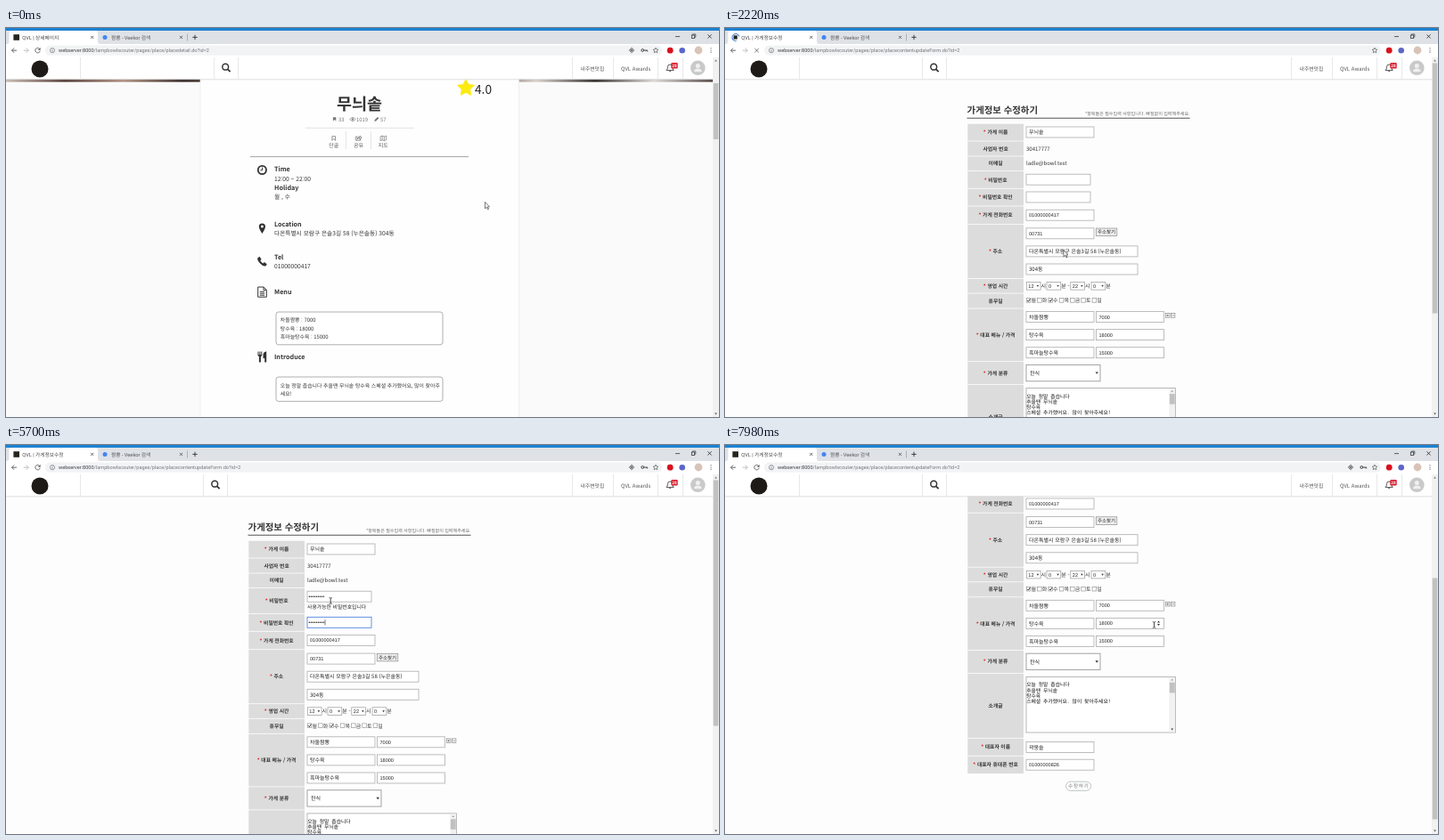
Write an HTML page that moves like this. It is 800 by 437 pixels and loops after 8 s.

```html
<!DOCTYPE html>
<html lang="ko">
<head>
<meta charset="utf-8">
<title>Store page</title>
<style>
html, body { margin: 0; width: 100%; height: 100%; overflow: hidden; background: #fff; }
svg { display: block; width: 100%; height: 100%; font-family: 'Noto Sans CJK KR', 'Noto Sans CJK', sans-serif; }
text { white-space: pre; text-rendering: geometricPrecision; }
.ui { font-family: Roboto, 'Noto Sans CJK KR', sans-serif; }
.num { font-family: 'Liberation Sans', 'Noto Sans CJK KR', sans-serif; }
.mono { font-family: 'Noto Sans Mono CJK KR', 'Noto Sans CJK KR', monospace; }
.b { font-weight: 700; }
.mid { text-anchor: middle; }
</style>
</head>
<body>
<svg id="stage" viewBox="0 0 800 437"></svg>
<script>
const LOOP = 8000, STEP = 60;
const SHOP = '무늬솥', TEL = '01000000417';
const STREET = '다온특별시 모람구 은솔3길 58 (누은솔동)', UNIT = '304동';
const HOST = 'webserver:8000', PATH = '/lampbowlscouter/pages/place/';

// Markup helpers
const text = (x, y, s, size = 6, fill = '#333', cls = '', more = '') =>
  `<text x="${x}" y="${y}" font-size="${size}" fill="${fill}" class="${cls}" ${more}>${s}</text>`;
const rect = (x, y, w, h, fill = 'none', stroke = 'none', more = '') =>
  `<rect x="${x}" y="${y}" width="${w}" height="${h}" fill="${fill}" stroke="${stroke}" ${more}/>`;
const path = (d, fill = 'none', stroke = 'none', sw = 1, more = '') =>
  `<path d="${d}" fill="${fill}" stroke="${stroke}" stroke-width="${sw}" ${more}/>`;
const line = (x1, y1, x2, y2, stroke = '#ddd', sw = 0.8) => path(`M${x1} ${y1}L${x2} ${y2}`, 'none', stroke, sw);
const circle = (x, y, r, fill = 'none', stroke = 'none', sw = 0.8) =>
  `<circle cx="${x}" cy="${y}" r="${r}" fill="${fill}" stroke="${stroke}" stroke-width="${sw}"/>`;
const ellipse = (x, y, rx, ry, fill) => `<ellipse cx="${x}" cy="${y}" rx="${rx}" ry="${ry}" fill="${fill}"/>`;
const group = (id, body, more = '') => `<g id="${id}" ${more}>${body}</g>`;
const at = (x, y, body) => `<g transform="translate(${x} ${y})">${body}</g>`;
const down = (x, y, r = 1.5, fill = '#333') => path(`M${x - r} ${y - r * 0.6}h${2 * r}l${-r} ${r * 1.4}z`, fill);
const up = (x, y, r = 1.5, fill = '#333') => path(`M${x - r} ${y + r * 0.6}h${2 * r}l${-r} ${-r * 1.4}z`, fill);
const star = (x, y, r, fill, stroke = 'none') => {
  let d = '';
  for (let i = 0; i < 10; i++) {
    const a = Math.PI * (i / 5 - 0.5), q = i % 2 ? r * 0.5 : r;
    d += (i ? 'L' : 'M') + (x + q * Math.cos(a)).toFixed(2) + ' ' + (y + q * Math.sin(a)).toFixed(2);
  }
  return path(d + 'z', fill, stroke, 0.7, 'stroke-linejoin="round"');
};
const bookmark = (x, y, s, fill, stroke) =>
  path(`M${x - s} ${y - s * 1.3}h${2 * s}v${s * 2.6}l${-s} ${-s}l${-s} ${s}z`, fill, stroke, 0.6);

function browser() {
  const dark = '#5f6368';
  const close = (x, y, r, c = '#444') =>
    path(`M${x - r} ${y - r}l${2 * r} ${2 * r}m0 ${-2 * r}l${-2 * r} ${2 * r}`, 'none', c, 0.8);
  return rect(0, 0, 800, 33, '#fff') + rect(0, 0, 800, 18, '#dee1e6') + rect(0, 0, 800, 3, '#1b82d2') +
    path('M1 18Q3.5 18 3.5 15V6Q3.5 3 6.5 3H100Q103 3 103 6V15Q103 18 105.5 18z', '#fff') +
    group('favicon', rect(8.4, 7.2, 6.6, 6.6, '#26261f')) +
    group('spinner', rect(9.6, 8.4, 4.2, 4.2, '#26261f') + path('M12 6.6A4 4 0 1 1 8 10.6', 'none', '#3b78c4', 1, 'id="arc"')) +
    text(18.3, 12.7, '', 5.7, '#444', 'ui', 'id="tabTitle"') + close(96.7, 10.4, 1.5) +
    circle(111, 10.4, 2.5, '#4285f4') + text(118, 12.7, '짬뽕 - Veekor 검색', 5.7, '#555', 'ui') +
    close(196.5, 10.4, 1.5) + line(203.5, 6.5, 203.5, 14.5, '#8a8d91', 0.6) +
    path('M209.3 10.4h5.4m-2.7 -2.7v5.4', 'none', '#333', 0.9) +
    line(751, 9.6, 756, 9.6, '#222', 0.7) + rect(769.3, 8, 3.4, 3.4, 'none', '#222', 'stroke-width=".7"') +
    path('M770.5 8V6.9h3.3v3.3h-1', 'none', '#222', 0.6) + close(789.5, 9.4, 2.1, '#222') +
    rect(44, 19.4, 692, 11.4, '#f1f3f4', 'none', 'rx="5.7"') +
    path('M12 25.2H6.6m2.5 -2.6l-2.6 2.6l2.6 2.6', 'none', '#555', 0.9) +
    path('M19.8 25.2h5.4m-2.5 -2.6l2.6 2.6l-2.6 2.6', 'none', '#b5b7ba', 0.9) +
    group('reload', path('M37.6 23.4A2.7 2.7 0 1 0 38.2 25.8', 'none', '#555', 0.9) + path('M38.6 21.9v2.9h-2.9z', '#555')) +
    group('stop', close(35.6, 25.2, 2.2, '#555')) +
    circle(52, 25.2, 2.6, 'none', dark, 0.6) + line(52, 24.8, 52, 26.7, dark, 0.7) + line(52, 23.5, 52, 24.1, dark, 0.7) +
    `<text x="59" y="27.2" font-size="5.6" class="ui" fill="#74787c"><tspan fill="#3c4043">${HOST}</tspan><tspan id="url"></tspan></text>` +
    group('pageIcons', circle(702, 25, 2, 'none', '#444', 0.7) + circle(702, 25, 0.9, '#444') +
      path('M702 21.8v1.2m0 4v1.2m-3.2 -3.2h1.2m4 0h1.2', 'none', '#444', 0.6) +
      circle(714.3, 25, 1.4, 'none', '#444', 1) + path('M715.7 25h4v1.5m-1.6 -1.5v1.2', 'none', '#444', 0.9)) +
    star(729, 25.2, 3, 'none', '#555') + circle(745.2, 25.2, 3.4, '#d8121f') + circle(758.7, 25.2, 3.3, '#5b66c9') +
    circle(777, 25, 4.4, '#d9c3b8') + [22.8, 25, 27.2].map(y => circle(791, y, 0.6, '#555')).join('');
}

function header() {
  return rect(0, 33, 793, 24.6, '#fff') + line(0, 57.8, 793, 57.8, '#d8d8d8') + circle(38, 46, 9.5, '#1d1a17') +
    [83.5, 635.5, 681.5, 731.5, 759.5].map(x => line(x, 33, x, 57.5, '#e2e2e2')).join('') +
    group('search', line(233.5, 33, 233.5, 57.5, '#e2e2e2') + line(260.5, 33, 260.5, 57.5, '#e2e2e2') +
      circle(246.2, 43.7, 3.4, 'none', '#333', 1.5) + line(248.8, 46.3, 251.6, 49.1, '#333', 1.8)) +
    text(644.6, 47.6, '내주변맛집', 5.8, '#555') + text(690, 47.6, 'QVL Awards', 6, '#555') +
    path('M741 47.6q1.5 -1.2 1.5 -4a2.6 2.6 0 0 1 5.2 0q0 2.8 1.5 4zM744.2 48.6h1.8', 'none', '#444', 0.9) +
    rect(746.3, 39, 7.4, 6.4, '#d81e2c', 'none', 'rx="1.2"') + text(750, 44, '28', 4.6, '#fff', 'b mid') +
    circle(776.3, 44.8, 8.3, '#c9c9c9') + circle(776.3, 42.4, 2.5, '#f0f0f0') + path('M772 49.2q0 -3.7 4.3 -3.7t4.3 3.7z', '#f0f0f0');
}

const photo = () => `<svg x="289.5" y="396.4" width="42" height="41.6">` +
  rect(0, 0, 42, 42, '#a3968d') + rect(0, 0, 42, 9, '#ddd8d2') + rect(0, 0, 13, 12, '#5c5250') +
  ellipse(21, 24, 19.5, 16, '#2b2223') + ellipse(21.5, 20, 17, 11, '#a9482d') +
  ellipse(23, 18.5, 12.5, 7.5, '#d9a566') + ellipse(21, 17.5, 6.5, 4, '#f0e2cb') + '</svg>';

function storePage() {
  const ink = '#333', head = (y, s) => text(301, y, s, 7.2, ink, 'b');
  const info = (y, s) => text(301, y, s, 6.7, ink);
  const box = (y, h) => rect(303, y, 187, h, '#fff', '#a6a6a6', 'rx="2.8" stroke-width=".9"');
  const note = (y, s) => text(307.8, y, s, 5.9, ink);
  const pill = (x, s) => rect(x, 359, 27.3, 9.6, '#fff', '#a5a5a5', 'rx="4.8" stroke-width=".7"') +
    text(x + 13.8, 366, s, 5.8, '#666', 'mid', 'letter-spacing=".45"');
  const top =
    star(516, 67.4, 10, '#fdea10', '#fdea10') + text(526, 73.6, '4.0', 13.7, '#222') +
    text(396.5, 92.3, SHOP, 18.5, ink, 'b mid') +
    bookmark(368.6, 102.4, 1.7, '#777', 'none') + text(373, 104.7, '33', 5.9, '#777') +
    path('M386 102.5q3 -4 6 0q-3 4 -6 0z', 'none', '#777', 0.8) + circle(389, 102.5, 1.1, '#777') + text(393, 104.7, '1019', 5.9, '#777') +
    path('M413.3 105l.5 -1.9l3.2 -3.2l1.4 1.4l-3.2 3.2z', '#777') + text(420, 104.7, '57', 5.9, '#777') +
    line(336, 112.3, 458, 112.3) + line(381.5, 116, 381.5, 136) + line(409.5, 116, 409.5, 136) +
    bookmark(367.7, 124, 1.8, 'none', '#555') +
    path('M394.5 122h-1.8v4.2h5v-1.4M394 124.6q.5 -2.3 3 -2.3v-1.1l2 1.8l-2 1.8v-1.1q-2 0 -3 .9z', 'none', '#444', 0.6) +
    path('M420 122l2.2 -.8l2.2 .8l2.2 -.8v4.6l-2.2 .8l-2.2 -.8l-2.2 .8zM422.2 121.2v4.6m2.2 -3.8v4.6', 'none', '#666', 0.6) +
    [[367.7, '단골'], [395.6, '공유'], [423.3, '지도']].map(([x, s]) => text(x, 133.8, s, 6, '#555', 'mid')).join('') +
    line(274, 144.6, 519, 144.6, '#999', 0.9) +
    circle(287.4, 159.5, 4.6, 'none', ink, 1.8) + path('M287.6 156.6v3.2h-2.3', 'none', ink, 1) +
    head(161.4, 'Time') + info(172, '12:00 ~ 22:00') + head(182.3, 'Holiday') + info(192, '월 , 수') +
    path('M287.4 231q-3.6 -5.5 -3.6 -8a3.6 3.6 0 0 1 7.2 0q0 2.5 -3.6 8zM287.4 221.4a1.5 1.5 0 1 0 .01 0z', ink, 'none', 0, 'fill-rule="evenodd"') +
    head(222.6, 'Location') + info(232.6, `${STREET} ${UNIT}`) +
    path('M282.4 258.2l2.2 -1.4l2 3.2l-1.3 1.3q1 2 3.2 3.2l1.3 -1.4l3 2.1l-1.4 2.2q-2.5 1 -6.3 -3t-2.7 -6.2z', ink) +
    head(260, 'Tel') + info(270.2, TEL) +
    path('M282.7 291h6.4l3.2 3.2v8h-9.6zM289 291v3.3h3.2M284.8 296.2h5.3m-5.3 2h5.3m-5.3 2h5.3', 'none', ink, 1) +
    head(299.4, 'Menu') + box(319, 36.8) +
    ['차돌짬뽕 : 7000', '탕수육 : 18000', '흑마늘탕수육 : 15000'].map((s, i) => note(330.4 + 9.2 * i, s)).join('') +
    path('M282.5 363.5v3.8q0 1.4 1.4 1.7v6.5h2v-6.5q1.4 -.3 1.4 -1.7v-3.8h-1v3.5h-.9v-3.5h-1v3.5h-.9v-3.5zM292.2 363.3v12.2h-2v-4.5h-1.7v-4.5q.5 -2.6 3.7 -3.2z', ink) +
    head(372.2, 'Introduce') + box(392, 27.4) +
    note(403.5, `오늘 정말 춥습니다 추울땐 ${SHOP} 탕수육 스페셜 추가했어요, 많이 찾아주`) + note(412.7, '세요!');
  const review =
    rect(368.3, 312.8, 56.4, 15, '#fff', '#b9b9b9', 'id="edit" stroke-width=".9"') +
    text(397, 323.2, '가게정보수정', 8, '#111', 'b mid', 'letter-spacing=".95"') +
    line(226, 341, 567, 341, '#b5b5b5') + text(226.3, 348.3, 'Review', 6, '#555') +
    circle(537, 346.2, 2, 'none', '#444', 1.5) + text(540, 348.3, '리뷰남기기', 5.8, '#444') +
    pill(501, '신고하기') + pill(530.3, '답장하기') +
    circle(259, 375.5, 4.6, 'none', '#444', 0.8) + circle(259, 374.2, 1.6, '#444') + path('M255.8 378.2q0 -2 3.2 -2t3.2 2q-3.2 2.4 -6.4 0z', '#444') +
    [250.6, 256.3, 262, 267.7].map(x => star(x, 387.5, 3, '#d2701c')).join('') +
    text(289.5, 376.2, '담솔이 | 2020-01-21 18:16:58', 6, '#777') +
    rect(289.5, 379, 230, 13, '#efefef') + text(292, 387.6, '짬뽕 맛있어용', 5.9, '#555') +
    path('M538 393.3l-5.2 -5.3a3.4 3.4 0 0 1 5.2 -5a3.4 3.4 0 0 1 5.2 5z', '#9fb0be') + text(538, 401.4, '0', 6, '#666', 'mid') +
    photo();
  return rect(0, 33, 793, 760, '#fafafa') +
    rect(0, 0, 793, 60.6, 'url(#banner)') + rect(218, 33, 357.5, 760, '#fefefe', '#ececec', 'stroke-width=".7"') +
    top + at(0, 128.5, review);
}

function formPage() {
  const cell = (y, h, s, must = true) => rect(272.3, y + 0.4, 62.7, h - 0.8, '#dcdcdc') +
    text(303.6, y + h / 2 + 2.1, (must ? '<tspan fill="#d22">* </tspan>' : '') + s, 5.8, '#333', 'b mid');
  const frame = (x, y, w, more = '') => rect(x, y - 6, w, 12, '#fff', '#adadad', `stroke-width=".8" ${more}`);
  const field = (y, s, w = 76, x = 338) => frame(x, y, w) +
    (/[가-힣]/.test(s) ? text(x + 3, y + 2.3, s, 6, '#222') : text(x + 3, y + 2, s, 5.55, '#222', 'num'));
  const pick = (x, s) => rect(x, 285.5, 15.8, 8.6, '#fff', '#999', 'stroke-width=".7"') +
    text(x + 2, 291.8, s, 5.55, '#222', 'num') + down(x + 12.6, 289.8, 1.3);
  const val = (x, y, s) => text(x, y, s, 6, '#333');
  const day = (s, i) => {
    const x = 338.3 + 12.3 * i;
    return rect(x, 303.6, 4.6, 4.6, '#fff', '#888', 'stroke-width=".6"') +
      (i % 2 || i > 2 ? '' : path(`M${x + 0.9} 306l1.2 1.3l2 -3`, 'none', '#222', 0.9)) + val(x + 5.2, 308.4, s);
  };
  const tool = (x, d) => rect(x, 320.6, 4.6, 4.6, '#fff', '#777', 'stroke-width=".6"') + path(d, 'none', '#555', 0.6);
  const menu = [['차돌짬뽕', '7000'], ['탕수육', '18000'], ['흑마늘탕수육', '15000']];
  const story = ['오늘 정말 춥습니다', `추울땐 ${SHOP}`, '탕수육', '스페셜 추가했어요. 많이 찾아주세요!'];
  const head =
    text(271.6, 95.6, '가게정보 수정하기', 10.4, '#333', 'b') +
    text(521.5, 98.4, '*항목들은 필수입력 사항입니다. 빠짐없이 입력해주세요.', 5.05, '#666', '', 'text-anchor="end"') +
    line(271.5, 101.2, 521.5, 101.2, '#555', 1.1) +
    cell(107.3, 19.7, '가게 이름') + field(117, SHOP) +
    cell(127, 17, '사업자 번호', false) + val(338, 137.5, '30417777') +
    cell(144, 16.6, '이메일', false) + val(338, 154.3, 'ladle@bowl.test') +
    group('pwCell', cell(160.6, 19.7, '비밀번호')) + group('pwCellTall', cell(160.6, 29, '비밀번호')) +
    frame(338, 170.2, 72, 'id="pw1"') + group('dots1', '') +
    text(338, 183.6, '사용가능한 비밀번호입니다', 5.85, '#222', '', 'id="pwNote"');
  const rest =
    cell(180.3, 19.7, '비밀번호 확인') + frame(338, 190, 72, 'id="pw2"') + group('dots2', '') +
    cell(200, 20.4, '가게 전화번호') + field(210.2, TEL) +
    cell(220.4, 61, '주소') + field(230.8, '00731') + field(250.9, STREET, 125) + field(271, UNIT, 125) +
    rect(416.3, 225, 23.5, 8.6, '#efefef', '#8a8a8a', 'stroke-width=".7"') + text(428, 231.4, '주소찾기', 5.5, '#222', 'mid') +
    cell(281.4, 16.6, '영업 시간') +
    pick(338.3, '12') + val(354.4, 292, '시') + pick(361, '0') + val(377.2, 292, '분 -') +
    pick(387.8, '22') + val(404, 292, '시') + pick(411, '0') + val(427.2, 292, '분') +
    cell(298, 17, '휴무일', false) + [...'월화수목금토일'].map(day).join('') +
    cell(315, 59.6, '대표 메뉴 / 가격') +
    menu.map(([a, b], i) => field(324.5 + 20.1 * i, a) + field(324.5 + 20.1 * i, b, 76, 416.5)).join('') +
    group('stepper', up(486.5, 342.9, 1.5) + down(486.5, 346.1, 1.5)) +
    tool(494.3, 'M495.3 322.9h2.6m-1.3 -1.3v2.6') + tool(500.3, 'M501.3 322.9h2.6') +
    cell(374.6, 26, '가게 분류') + rect(338, 378.4, 83, 18.4, '#fff', '#999', 'stroke-width=".9"') +
    text(342, 389.9, '한식', 6, '#222') + down(417.2, 387.5, 1.7) +
    cell(400.6, 72.9, '소개글', false) + rect(338, 404.6, 167.5, 62.6, '#fff', '#a5a5a5', 'stroke-width=".8"') +
    story.map((s, i) => text(338.2, 415.6 + 6.25 * i, s, 5.8, '#111', 'mono')).join('') +
    rect(498.4, 405.1, 6.7, 61.6, '#f1f1f1') + rect(498.8, 411, 5.9, 11.6, '#c1c1c1') +
    up(501.7, 408, 1.3, '#999') + down(501.7, 463.6, 1.3) +
    cell(473.5, 20, '대표자 이름') + field(483.6, '곽뭉솔') +
    cell(493.5, 20.2, '대표자 휴대폰 번호') + field(503.4, '01000000826') +
    rect(382.5, 522.4, 28, 10, '#fff', '#a9b5ae', 'rx="5" stroke-width=".8"') +
    text(396.7, 529.6, '수정하기', 5.8, '#777', 'mid', 'letter-spacing=".5"');
  return rect(0, 33, 793, 600, '#fdfdfd') + head + group('formRest', rest);
}

const pointers =
  group('arrow', path('M0 0V7.4L1.8 5.8L3 8.4L4.1 7.9L2.9 5.4H5z', '#fff', '#444', 0.7)) +
  group('hand', path('M-.9 4.2V-.2q.9 -1.2 1.8 0V2.6l3.3 .8q1 .5 .7 2l-.7 3H-.9l-2.4 -3.6q.4 -1.4 2.4 .4z', '#fff', '#222', 0.7)) +
  group('beam', path('M-1.7 -3.3q1.5 0 1.7 .6q.2 -.6 1.7 -.6M0 -2.8V2.8M-1.7 3.3q1.5 0 1.7 -.6q.2 .6 1.7 .6', 'none', '#222', 0.8));

const bannerTones = ['#c9b8ae', '#4b332c', '#b08c7d', '#2c201d', '#6d4a3e', '#6d4a3e', '#6d4a3e', '#6d4a3e',
  '#3a2a25', '#d9d0ca', '#241e1d', '#ddd8d4', '#4a3d39'];

const stage = document.getElementById('stage');
stage.innerHTML =
  '<defs><linearGradient id="banner">' +
  bannerTones.map((c, i) => `<stop offset="${i / (bannerTones.length - 1)}" stop-color="${c}"/>`).join('') +
  '</linearGradient></defs>' +
  rect(0, 0, 800, 437, '#fff') + group('store', storePage()) + group('form', formPage()) + header() +
  rect(793, 33, 7, 404, '#f1f1f1') + up(796.5, 36.6, 1.4, '#777') + down(796.5, 433.4, 1.4, '#555') +
  rect(793.7, 0, 5.6, 0, '#c1c1c1', 'none', 'id="thumb"') + browser() + group('pointer', pointers);

const $ = Object.fromEntries([...stage.querySelectorAll('[id]')].map(e => [e.id, e]));
const set = (id, a) => { for (const k in a) $[id].setAttribute(k, a[k]); };
const show = (id, on) => set(id, { visibility: on ? 'inherit' : 'hidden' });
const clamp = v => Math.max(0, Math.min(1, v));
const span = (t, a, b) => clamp((t - a) / (b - a));
const smooth = p => p * p * (3 - 2 * p);
const easeOut = p => 1 - (1 - p) ** 2;

// Pointer moves: start, end, x, y
const moves = [[0, 0, 537.5, 195.5], [540, 1080, 395.6, 324], [1860, 2580, 364.2, 175], [5940, 6420, 513.7, 320.5], [7260, 7920, 481.5, 202]];

function pointerAt(t) {
  let [, , x, y] = moves[0];
  for (const [a, b, mx, my] of moves.slice(1)) {
    const p = smooth(span(t, a, b));
    x += (mx - x) * p;
    y += (my - y) * p;
  }
  return [x, y];
}

function password(id, y, t, start, gap, focused) {
  const n = Math.max(0, Math.min(9, Math.floor((t - start) / gap) + 1));
  const idle = t - (n ? start + (n - 1) * gap : start - 300);
  let s = '';
  for (let i = 0; i < n; i++) s += circle(340.4 + 2 * i, y, 0.75, '#222');
  if (focused && idle % 1000 < 500) s += line(340 + 2 * n, y - 3, 340 + 2 * n, y + 3, '#111', 0.6);
  $[id].innerHTML = s;
}

function draw(t) {
  const onForm = t >= 1620, loading = t >= 1380 && t < 2640, updating = t >= 1380;
  const checked = t >= 4080, matched = t >= 7140;
  show('store', !onForm);
  show('form', onForm);
  set('search', { transform: `translate(${onForm ? -12 : 0} 0)` });

  $.tabTitle.textContent = 'QVL | ' + (updating ? '가게정보수정' : '상세페이지');
  $.url.textContent = PATH + (updating ? 'placecontentupdateForm' : 'placedetail') + '.do?id=2';
  show('favicon', !loading);
  show('spinner', loading);
  show('reload', !loading);
  show('stop', loading);
  show('pageIcons', !loading);
  set('arc', { transform: `rotate(${t * 0.4 % 360} 12 10.6)` });

  let top, len;
  if (onForm) {
    const p = easeOut(span(t, 6240, 6720));
    const y = 152.6 * p + (matched ? 0.9 : 0);
    set('form', { transform: `translate(0 ${-y})` });
    set('formRest', { transform: `translate(0 ${checked ? 9.3 : 0})` });
    top = 39.5 + 105 * p + (matched ? 5 : 0);
    len = matched ? 271 : checked ? 276 : 281;
  } else {
    const p = easeOut(span(t, 0, 300));
    set('store', { transform: `translate(0 ${-128.5 * p})` });
    top = 62 + 20 * p;
    len = 63;
  }
  set('thumb', { y: top, height: len });

  const hover = t >= 1020;
  set('edit', { fill: hover ? '#2ee59d' : '#fff', stroke: hover ? '#4b8f74' : '#b9b9b9', 'stroke-dasharray': hover ? '1 1' : 'none' });

  const first = t >= 2700 && !checked, second = checked && !matched;
  show('pwCell', !checked);
  show('pwCellTall', checked);
  show('pwNote', checked);
  set('pw1', { stroke: first ? '#3b78e0' : '#adadad' });
  set('pw2', { stroke: second ? '#3b78e0' : '#adadad' });
  password('dots1', 170.2, t, 2880, 120, first);
  password('dots2', 190, t, 4500, 130, second);
  show('stepper', onForm && t >= 7860);

  const [x, y] = pointerAt(t);
  const kind = hover && !onForm ? 'hand' : (t >= 2520 && t < 6000) || t >= 7800 ? 'beam' : 'arrow';
  for (const k of ['arrow', 'hand', 'beam']) show(k, k === kind);
  set('pointer', { transform: `translate(${x} ${y})` });
}

const begin = performance.now();
function tick() {
  const t = (performance.now() - begin) % LOOP;
  draw(Math.floor(t / STEP) * STEP);
  requestAnimationFrame(tick);
}
tick();
</script>
</body>
</html>
```
